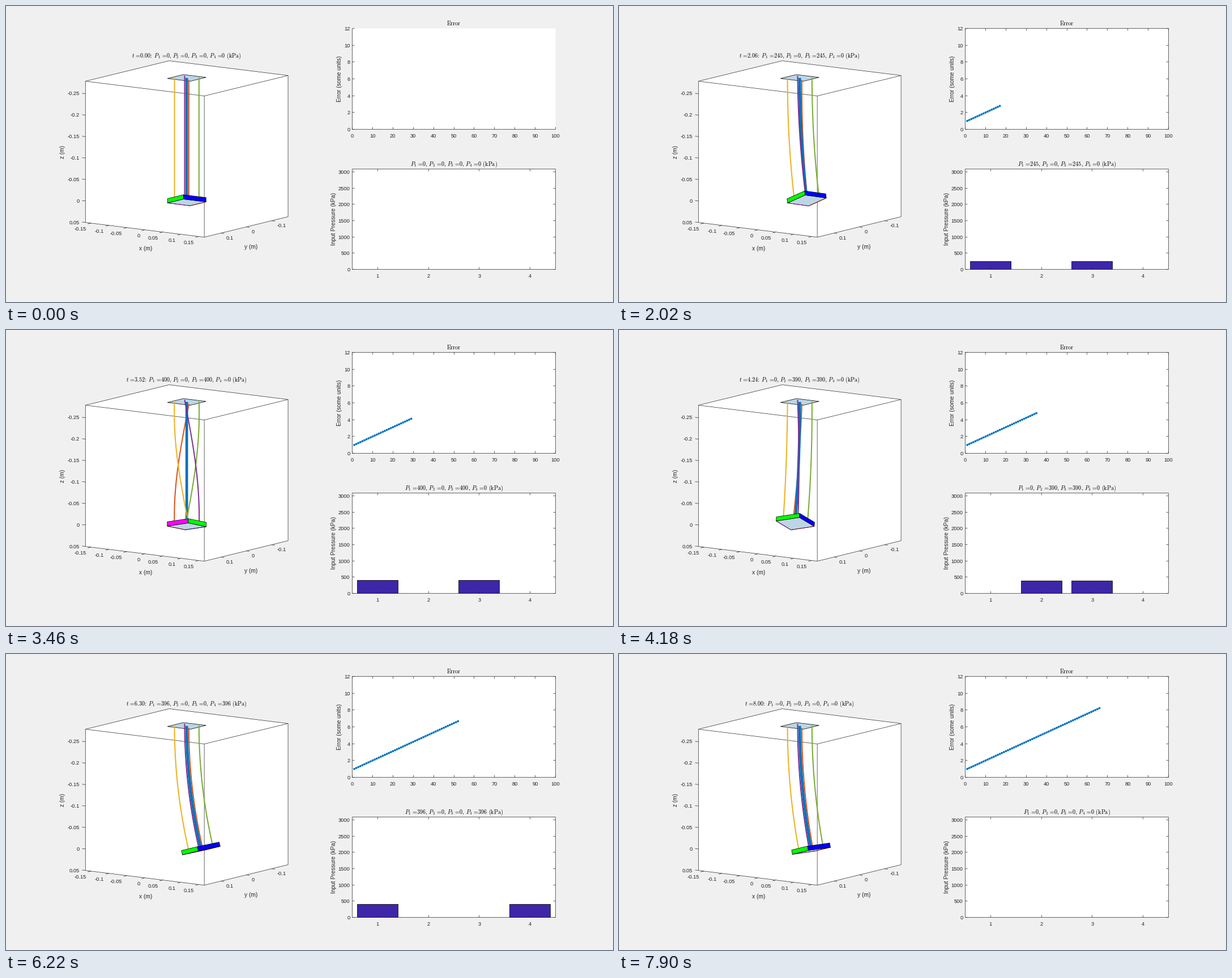
These frames come from a looping animation (1072 by 522 pixels, 8000 ms). A matplotlib script:

```python
import numpy as np
import matplotlib.pyplot as plt
from matplotlib.animation import FuncAnimation
from matplotlib.collections import LineCollection
from matplotlib.patches import Polygon

W, H = 1072, 522
PX = 0.72                      # points per pixel at 100 dpi
INK = "#262626"
PLATE = "#bdd5e5"
BLUE, ORANGE, YELLOW, PURPLE, GREEN = (
    "#0072bd", "#d95319", "#edb120", "#7e2f8e", "#77ac30")

plt.rcParams.update({"font.family": "Liberation Sans", "mathtext.fontset": "cm"})
fig = plt.figure(figsize=(W / 100, H / 100), dpi=100, facecolor="#f0f0f0")
ax = fig.add_axes([0, 0, 1, 1])
ax.set(xlim=(0, W), ylim=(H, 0))
ax.axis("off")


# ---------- drawing helpers ----------
def crisp(v):
    return np.floor(v) + 0.5


def strokes(segments, z=3):
    lines = LineCollection(segments, colors=INK, linewidths=0.7 * PX, zorder=z)
    lines.set_snap(False)
    return ax.add_collection(lines)


def shape(points, face, edge="black", lw=0.75, z=2):
    poly = Polygon(points, closed=True, facecolor=face, edgecolor=edge,
                   linewidth=lw * PX, zorder=z, joinstyle="round")
    poly.set_snap(False)
    return ax.add_patch(poly)


def label(x, y, text, ha="center", size=9.4):
    ax.text(x, y + 0.36 * size, text, ha=ha, va="baseline",
            fontsize=size * PX, color=INK, zorder=4)


def side_label(x, y, text):
    ax.text(x, y, text, ha="center", va="center", rotation=90,
            fontsize=10.1 * PX, color=INK, zorder=4)


def title(x, y, text):
    return ax.text(x, y, text, ha="center", va="baseline",
                   fontsize=10.15 * PX, color="black", zorder=4)


# ---------- the two plots on the right ----------
LEFT, RIGHT = 611.5, 970.5


def plot_frame(top, bottom, xticks, yticks, tick=4):
    """Draw a 2D axes; return its closing top and right side."""
    shape([(LEFT, top), (RIGHT, top), (RIGHT, bottom), (LEFT, bottom)],
          "white", "none", z=1)
    near = [[(LEFT, top), (LEFT, bottom)], [(LEFT, bottom), (RIGHT, bottom)]]
    far = [[(LEFT, top), (RIGHT, top)], [(RIGHT, top), (RIGHT, bottom)]]
    for x, text in xticks:
        label(x, bottom + 11, text)
        x = crisp(x)
        near.append([(x, bottom), (x, bottom - tick)])
        far.append([(x, top), (x, top + tick)])
    for y, text in yticks:
        label(607.5, y, text, "right")
        y = crisp(y)
        near.append([(LEFT, y), (LEFT + tick, y)])
        far.append([(RIGHT, y), (RIGHT - tick, y)])
    strokes(near)
    return strokes(far)


def error_x(n):
    return LEFT + 3.59 * n


def error_y(e):
    return 217.5 - e * 178 / 12


def bar_x(n):
    return LEFT + 89.75 * (n - 0.5)


def bar_y(p):
    return 464.5 - p * 0.0573


closing = plot_frame(39.5, 217.5,
                     [(error_x(n), str(n)) for n in range(0, 101, 10)],
                     [(error_y(e), str(e)) for e in range(0, 13, 2)])
plot_frame(287.5, 464.5,
           [(bar_x(n), str(n)) for n in range(1, 5)],
           [(bar_y(p), str(p)) for p in range(0, 3001, 500)])
side_label(589, 128.5, "Error (some units)")
side_label(578.5, 375.5, "Input Pressure (kPa)")
title(791, 33.5, r"$\mathrm{Error}$")

# round caps on tiny strokes keep the dots off the pixel grid
dots = ax.add_collection(LineCollection([], colors=BLUE, linewidths=3.9 * PX,
                                        capstyle="round", zorder=3))
dots.set_snap(False)
bars = [shape([(0, 0)] * 4, "#3e26a8", z=2) for _ in range(4)]


# ---------- 3D view ----------
SIGHT = np.array([1, 1.418, -0.308])      # line of sight into the scene
HALF, Z_TOP, Z_LOW = 0.1655, -0.279, 0.05


def project(p):
    x, y, z = np.moveaxis(np.asarray(p, float), -1, 0)
    return np.stack([319.2 + 634 * x - 447 * y,
                     338.8 + 78.5 * x + 109 * y + 757 * z], -1)


RING = np.array([(1, 1), (-1, 1), (-1, -1), (1, -1)])


def ring_at(half, z):
    return np.array([(*c, z) for c in RING * half])


def draw_box():
    front, left, back, right = project(ring_at(HALF, Z_TOP))
    low_front, low_left, _, low_right = project(ring_at(HALF, Z_LOW))
    shape([left, back, right, low_right, low_front, low_left], "white", "none", z=1)
    lines = [[left, back], [back, right], [right, front], [front, left],
             [left, low_left], [right, low_right], [front, low_front],
             [low_left, low_front], [low_front, low_right]]
    for v in np.arange(-3, 4) / 20:
        p = project((v, HALF, Z_LOW))
        lines.append([p, p + (-5.8, 1.4)])
        label(p[0] - 8.5, p[1] + 9.7, f"{v:.2g}", "right")
    for v in np.arange(-1, 2) / 10:
        p = project((HALF, v, Z_LOW))
        lines.append([p, p + (5.9, 0.7)])
        label(p[0] + 9.5, p[1] + 8, f"{v:.2g}", "left")
    for v in np.arange(-5, 2) / 20:
        p = project((-HALF, HALF, v))
        lines.append([p, p + (-5.9, -0.7)])
        label(130, p[1] - 0.5, f"{v:.2g}", "right")
    strokes(lines, z=1.5)
    label(247, 427, "x (m)", size=10.1)
    label(433, 424.5, "y (m)", size=10.1)
    side_label(100, 257.5, "z (m)")


draw_box()

LENGTH, PLATE_HALF, THICK, REACH = 0.28, 0.0315, 0.01, 0.02
SIDE_COLORS = [(1, 0, 1), (0, 1, 0), (0, 0, 1), (1, 0, 0)]


def cable(color, width, z):
    line, = ax.plot([], [], color=color, lw=width * PX, zorder=z,
                    solid_capstyle="butt")
    line.set_snap(False)
    return line


shape(project(ring_at(PLATE_HALF, -LENGTH)), PLATE, z=2)
core = cable(BLUE, 4.6, 2.2)
muscles = [cable(ORANGE, 2, 2.1), cable(YELLOW, 2, 2.3),
           cable(PURPLE, 2, 2.5), cable(GREEN, 2, 2.4)]
floor = shape([(0, 0)] * 4, PLATE, z=2.6)
sides = [shape([(0, 0)] * 4, c, z=2.7) for c in SIDE_COLORS]


# ---------- motion ----------
PHASE = 2                                  # seconds each pair is driven
PAIRS = [(3, 4), (1, 3), (2, 3), (1, 4)]
BEND, BEND_SPEED = 0.133, 6.7
TWIST, TWIST_SPEED = 1.87, 5.3


def pressures(t):
    """The active pair fills quickly and empties again as its phase ends."""
    gap = min(t % PHASE, PHASE - t % PHASE)
    level = 400 * (1 - np.exp(-0.033 - 15.1 * gap)) if gap > 1e-6 else 0
    pair = PAIRS[int(t // PHASE) % 4]
    return [level if n in pair else 0 for n in range(1, 5)]


def swing(t, speed, damping=0.45):
    """Step response of a damped spring."""
    u = speed * max(t, 0)
    w = np.sqrt(1 - damping ** 2)
    return 1 - np.exp(-damping * u) * (np.cos(w * u) + damping / w * np.sin(w * u))


def arm_state(t):
    """Neighbouring muscles bend the arm, opposite ones twist it."""
    def drive(i, speed):
        start = PHASE * i
        return swing(t - start, speed) - swing(t - start - PHASE + 0.1, speed)

    bend, twist = np.zeros(2), 0
    for i, pair in enumerate(PAIRS):
        pull = sum(RING[n - 1] for n in pair)
        if pull.any():
            bend += BEND * pull * drive(i, BEND_SPEED)
        else:
            twist += TWIST * drive(i, TWIST_SPEED)
    # the pull turns along with a twisted arm while it unwinds
    turn = 1.5 * twist
    x, y, _ = spin((*bend, 0), turn)
    return x, y, twist


def bend_matrix(angle, dx, dy):
    k = np.array([[0, 0, dx], [0, 0, dy], [-dx, -dy, 0]])
    return np.eye(3) + np.sin(angle) * k + (1 - np.cos(angle)) * k @ k


def spin(points, angle):
    c, s = np.cos(angle), np.sin(angle)
    x, y, z = np.moveaxis(np.asarray(points, float), -1, 0)
    return np.stack([c * x - s * y, s * x + c * y, z], -1)


def pose_arm(t):
    bx, by, twist = arm_state(t)
    angle = max(np.hypot(bx, by), 1e-6)
    dx, dy = bx / angle, by / angle

    s = np.linspace(0, 1, 25)
    out = LENGTH * (1 - np.cos(angle * s)) / angle
    spine = np.stack([out * dx, out * dy,
                      LENGTH * np.sin(angle * s) / angle - LENGTH], -1)
    frames = np.array([bend_matrix(angle * u, dx, dy) for u in s])

    core.set_data(*project(spine).T)
    for line, corner in zip(muscles, RING):
        offset = spin(np.tile([*corner * REACH, 0], (len(s), 1)), twist * s)
        line.set_data(*project(spine + np.einsum("nij,nj->ni", frames, offset)).T)

    def place(z):
        return spine[-1] + spin(ring_at(PLATE_HALF, z), twist) @ frames[-1].T

    top, low = place(0), place(THICK)
    top_px, low_px = project(top), project(low)
    floor.set_xy(low_px)
    floor.set_visible(frames[-1][:, 2] @ SIGHT < 0)
    for i, side in enumerate(sides):
        j = (i + 1) % 4
        outward = low[i] + low[j] - low[i - 1] - low[(j + 1) % 4]
        if outward @ SIGHT < 0:
            side.set_xy([top_px[i], top_px[j], low_px[j], low_px[i]])
            side.set_edgecolor("black")
            side.set_zorder(2.8)
        else:
            # only the lower rim of a far side shows
            side.set_xy([low_px[i], low_px[j]])
            side.set_edgecolor([0.5 * c for c in SIDE_COLORS[i]])
            side.set_zorder(2.7)


EQUALS = r"\hspace{0.117}=\hspace{-0.2}"


def pressure_text(values):
    parts = [f"P_{n}{EQUALS}{v:.0f}" for n, v in enumerate(values, 1)]
    return r",\hspace{0.18}".join(parts) + r"\hspace{0.38}\mathrm{(kPa)}"


arm_title = title(318.5, 91.3, "")
bar_title = title(791, 281.5, "")

TICK = 20                       # ms per drawn frame
LOOP = 8000
STEPS = 66


def update(frame):
    ms = frame * TICK
    step = 0 if ms < 100 else (ms - 100) // 120 + 1
    t = step * 8 / STEPS
    values = pressures(t)

    text = pressure_text(values)
    bar_title.set_text(f"${text}$")
    arm_title.set_text(rf"$t{EQUALS}{t:.2f}\hspace{{-0.2}}:\hspace{{0.3}}{text}$")

    points = [(error_x(n), error_y(1 + (n - 1) / 9)) for n in range(1, step + 1)]
    dots.set_segments([[(x - 0.05, y), (x + 0.05, y)] for x, y in points])
    closing.set_visible(step > 0)

    for i, (bar, value) in enumerate(zip(bars, values), 1):
        x0, x1 = crisp(bar_x(i - 0.4)), crisp(bar_x(i + 0.4))
        y = crisp(bar_y(value))
        bar.set_xy([(x0, 464.5), (x0, y), (x1, y), (x1, 464.5)])
        bar.set_visible(value > 0)

    pose_arm(t)
    return []


anim = FuncAnimation(fig, update, frames=LOOP // TICK, interval=TICK,
                     repeat=True, cache_frame_data=False)
plt.show()
```
